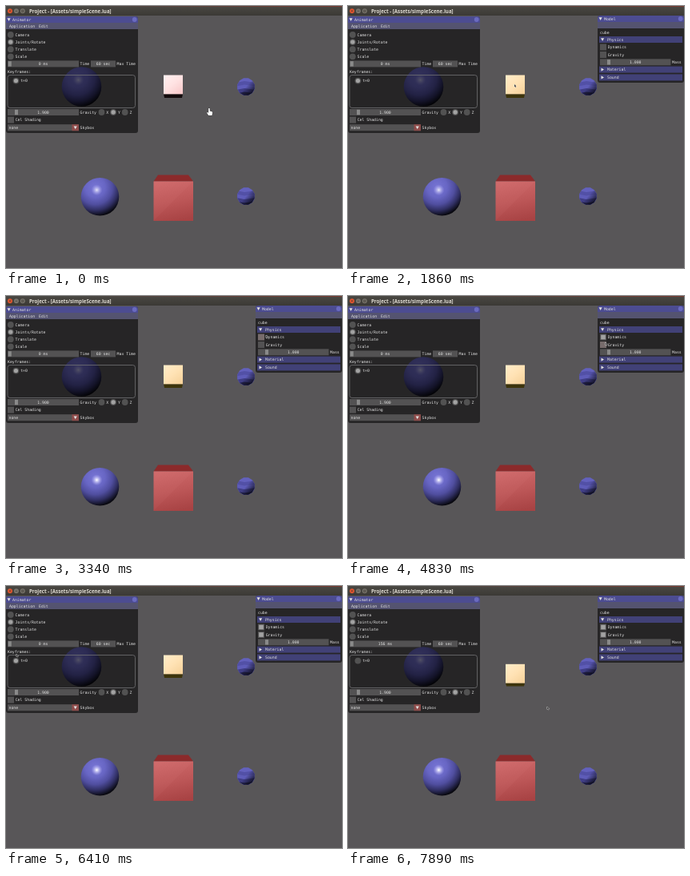
Recreate the animation shown at these times as an HTML page with a canvas. Size 420 by 328 pixels, loop 7.99 s.

```html
<!DOCTYPE html>
<html lang="en">
<head>
<meta charset="utf-8">
<title>Scene editor</title>
<style>
html, body { margin: 0; height: 100%; overflow: hidden; background: #585658; }
canvas { display: block; }
</style>
</head>
<body>
<canvas id="stage" width="420" height="328"></canvas>
<script>
const g = document.getElementById('stage').getContext('2d');
const LOOP = 7990, SELECT = 1580, SMOOTH = 3340, DYNAMICS = 3620, GRAVITY = 5110, PLAY = 7735;
const FRAME = 'rgba(204,204,204,.27)', HOVER = 'rgba(230,204,204,.42)', MARK = 'rgba(230,230,230,.55)';
const HEADER = 'rgba(102,102,230,.42)', INK = '#e2e2e2';

// Pointer tip over time: [ms, x, y]
const path = [
  [0, 254, 128], [90, 252, 126], [470, 211, 100], [560, 210, 99.5], [1390, 208, 98],
  [2410, 208, 98], [3240, 325, 49], [3620, 325, 49], [4360, 324, 50], [4640, 322, 58],
  [5300, 321, 59], [6320, 13, 85], [6410, 13, 85], [6600, 12, 92], [6760, 12, 92],
  [7600, 249, 151], [LOOP, 249, 151]
];
let tip = [0, 0];

function pointerAt(t) {
  const i = path.findIndex(p => p[0] > t);
  const [t0, x0, y0] = path[i - 1], [t1, x1, y1] = path[i];
  let k = (t - t0) / (t1 - t0);
  k = k * k * (3 - 2 * k);
  return [x0 + (x1 - x0) * k, y0 + (y1 - y0) * k];
}

function rect(x, y, w, h, fill) {
  g.fillStyle = fill;
  g.fillRect(x, y, w, h);
}

function poly(fill, ...p) {
  g.beginPath();
  for (let i = 0; i < p.length; i += 2) g.lineTo(p[i], p[i + 1]);
  g.closePath();
  g.fillStyle = fill;
  g.fill();
}

function disc(x, y, r, fill) {
  g.beginPath();
  g.arc(x, y, r, 0, 7);
  g.fillStyle = fill;
  g.fill();
}

function text(s, x, y, align = 'left') {
  g.font = '4.85px "DejaVu Sans Mono", monospace';
  g.textAlign = align;
  g.fillStyle = INK;
  g.fillText(s, x, y + 1.7);
}

function shade(x0, y0, x1, y1, ...colors) {
  const s = g.createLinearGradient(x0, y0, x1, y1);
  colors.forEach((c, i) => s.addColorStop(i / (colors.length - 1), c));
  return s;
}

// Lit from the upper left, falling to black at the lower right
function ball(x, y, r, shine) {
  const s = g.createRadialGradient(x - 6, y - 12, 0, x - 6, y - 12, r * 1.52);
  s.addColorStop(0, '#7775d4');
  s.addColorStop(.35, '#6866c4');
  s.addColorStop(.6, '#504e9f');
  s.addColorStop(.8, '#302f62');
  s.addColorStop(1, '#08080f');
  disc(x, y, r, s);
  const h = g.createRadialGradient(x - 4, y - 8.5, 0, x - 4, y - 8.5, 7);
  h.addColorStop(0, `rgba(255,255,255,${shine})`);
  h.addColorStop(.3, `rgba(235,233,255,${shine * .7})`);
  h.addColorStop(1, 'rgba(180,175,255,0)');
  disc(x - 4, y - 8.5, 7, h);
}

// Coarse sphere made of bent bands
function facetBall(x, y, bend) {
  g.save();
  g.beginPath();
  for (let i = 0; i < 12; i++) {
    const a = (i + .5) * Math.PI / 6;
    g.lineTo(x + 11.1 * Math.cos(a), y + 11.1 * Math.sin(a));
  }
  g.clip();
  const colors = ['#6361bd', '#5250a6', '#5e5cb8', '#403e86', '#222148'];
  const tops = [-14, -6, -1.5, 3, 7.5];
  colors.forEach((c, i) => {
    const v = y + tops[i];
    poly(c, x - 12, v + bend, x - 2, v - bend, x + 12, v + bend, x + 12, y + 12, x - 12, y + 12);
  });
  rect(x - 12, y - 12, 24, 24, shade(x, y, x + 9, y + 8, 'rgba(8,8,16,0)', 'rgba(8,8,16,.85)'));
  g.restore();
}

function bigCube() {
  poly('#8b2a2b', 190, 211.5, 228, 211.5, 234, 219.5, 184.5, 219.5);
  rect(184.5, 219.5, 49.5, 49.5, shade(205, 219, 215, 269, '#cd6768', '#bd5758', '#a84344'));
  poly('rgba(255,170,170,.04)', 184.5, 219.5, 234, 219.5, 184.5, 269);
}

function smallCube(selected, drop) {
  const y = 86.5 + drop, b = y + 23.8, depth = 4.7 - drop * .06;
  poly(selected ? '#3d340b' : '#130b0c', 197, b, 221, b, 220, b + depth, 198, b + depth);
  const tones = selected ? ['#ffecc8', '#ffe2b4', '#f6d29b'] : ['#fff0f0', '#ffe2e2', '#f8c9ca'];
  rect(197, y, 24, 23.8, shade(199, y, 218, b, ...tones));
}

function triangle(x, y, open) {
  if (open) poly(INK, x, y - 1.7, x + 4.2, y - 1.7, x + 2.1, y + 2);
  else poly(INK, x + .5, y - 2.1, x + 4, y, x + .5, y + 2.1);
}

function radio(x, y, on, label) {
  disc(x, y, 3.9, FRAME);
  if (on) disc(x, y, 2.7, MARK);
  text(label, x + 5.8, y);
}

function checkbox(x, y, on, label) {
  const over = tip[0] > x && tip[0] < x + 35 && Math.abs(tip[1] - y) < 4.5;
  rect(x, y - 4, 8, 8, over ? HOVER : FRAME);
  if (on) rect(x + 1.2, y - 2.8, 5.6, 5.6, MARK);
  text(label, x + 9.7, y);
}

function slider(x, y, w, value, grab, label) {
  rect(x, y - 4, w, 8, FRAME);
  if (grab !== null) rect(grab, y - 3.2, 4, 6.4, 'rgba(255,255,255,.32)');
  text(value, x + w / 2, y, 'center');
  text(label, x + w + 1.6, y);
}

function panel(x, y, w, bottom, title) {
  g.beginPath();
  g.roundRect(x, y, w, bottom - y, 3);
  g.fillStyle = 'rgba(0,0,0,.57)';
  g.fill();
  g.beginPath();
  g.roundRect(x, y, w, 8, [3, 3, 0, 0]);
  g.fillStyle = 'rgba(82,82,161,.87)';
  g.fill();
  triangle(x + 1.5, y + 4, true);
  text(title, x + 8, y + 4);
  disc(x + w - 4.3, y + 4, 2.9, '#6a6ac0');
  rect(x, y + 8, w, 8, 'rgba(102,102,140,.72)');
}

function animator(clock) {
  panel(0, 13, 165, 159, 'Animator');
  text('Application', 4, 25);
  text('Edit', 41, 25);
  ['Camera', 'Joints/Rotate', 'Translate', 'Scale'].forEach((s, i) => radio(5.8, 36 + 9.1 * i, i === 1, s));
  slider(2, 72.4, 89, clock + ' ms', 2.8, 'Time');
  slider(106, 72.4, 31, '60 sec', null, 'Max Time');
  text('Keyframes:', 2, 82);
  g.beginPath();
  g.roundRect(2, 86.5, 159.5, 41, 3);
  g.strokeStyle = '#727174';
  g.lineWidth = .8;
  g.stroke();
  radio(12.4, 93.6, !clock, 't=0');
  slider(2, 133, 89, '1.900', 11, 'Gravity');
  ['X', 'Y', 'Z'].forEach((s, i) => radio(119.5 + 14.6 * i, 133, i === 1, s));
  checkbox(2, 142.6, false, 'Cel Shading');
  slider(2, 152.2, 89, '', null, 'Skybox');
  text('none', 3.5, 152.2);
  rect(82.5, 148.2, 8.5, 8, '#8f4c4b');
  triangle(84.6, 152.2, true);
}

function header(y, open, label) {
  rect(314, y - 4, 104, 8, HEADER);
  triangle(316, y, open);
  text(label, 324, y);
}

function model(t) {
  panel(312, 12, 108, 96, 'Model');
  text('cube', 315, 33.5);
  header(42, true, 'Physics');
  checkbox(315, 51.5, t >= DYNAMICS, 'Dynamics');
  checkbox(315, 61, t >= GRAVITY, 'Gravity');
  slider(315, 70.3, 88.5, '1.000', 324, 'Mass');
  header(79.6, false, 'Material');
  header(89.4, false, 'Sound');
}

function titleBar() {
  rect(0, 0, 420, 12, shade(0, 0, 0, 12, '#4a4843', '#3b3935'));
  rect(0, 0, 420, 1, shade(100, 0, 420, 0, '#4a4843', '#7a3a30'));
  ['#e0562f', '#77746c', '#77746c'].forEach((c, i) => disc(5 + 7.9 * i, 6.3, 3, c));
  g.strokeStyle = '#3a332e';
  g.lineWidth = .6;
  g.beginPath();
  g.moveTo(3.9, 5.2); g.lineTo(6.1, 7.4);
  g.moveTo(6.1, 5.2); g.lineTo(3.9, 7.4);
  g.moveTo(11.6, 6.3); g.lineTo(14.2, 6.3);
  g.rect(19.7, 5.2, 2.2, 2.2);
  g.stroke();
  g.font = 'bold 6.15px "Open Sans", sans-serif';
  g.textAlign = 'left';
  g.fillStyle = '#dfdbd2';
  g.fillText('Project - [Assets/simpleScene.lua]', 29, 8.5);
}

function pointer(hand) {
  g.save();
  g.translate(...tip);
  g.beginPath();
  const shape = hand
    ? [-.8, 0, .6, 0, .9, 3.4, 3.6, 4.2, 4.2, 5.5, 3.4, 9, -.8, 9, -3, 5.8, -2.4, 4.9, -.9, 5.8]
    : [0, 0, 0, 3.4, .8, 2.7, 1.4, 3.9, 2, 3.6, 1.4, 2.4, 2.4, 2.3];
  for (let i = 0; i < shape.length; i += 2) g.lineTo(shape[i], shape[i + 1]);
  g.closePath();
  g.lineWidth = .7;
  g.fillStyle = hand ? '#fff' : '#444';
  g.strokeStyle = hand ? '#333' : '#eee';
  g.stroke();
  g.fill();
  g.restore();
}

function draw(t) {
  const clock = Math.max(0, Math.floor(t - PLAY));
  const selected = t >= SELECT;
  tip = pointerAt(t);
  rect(0, 0, 420, 328, '#585658');
  ball(94.5, 101, 24.8, .55);
  ball(117.5, 238.8, 23.8, t < SMOOTH ? .8 : 1);
  facetBall(300, 101, 1);
  facetBall(300, 238, -1);
  bigCube();
  smallCube(selected, 11.3 * (clock / 156) ** 2);
  animator(clock);
  if (selected) model(t);
  titleBar();
  pointer(!selected);
}

const start = performance.now();
function tick() {
  draw((performance.now() - start) % LOOP);
  requestAnimationFrame(tick);
}
tick();
</script>
</body>
</html>
```
